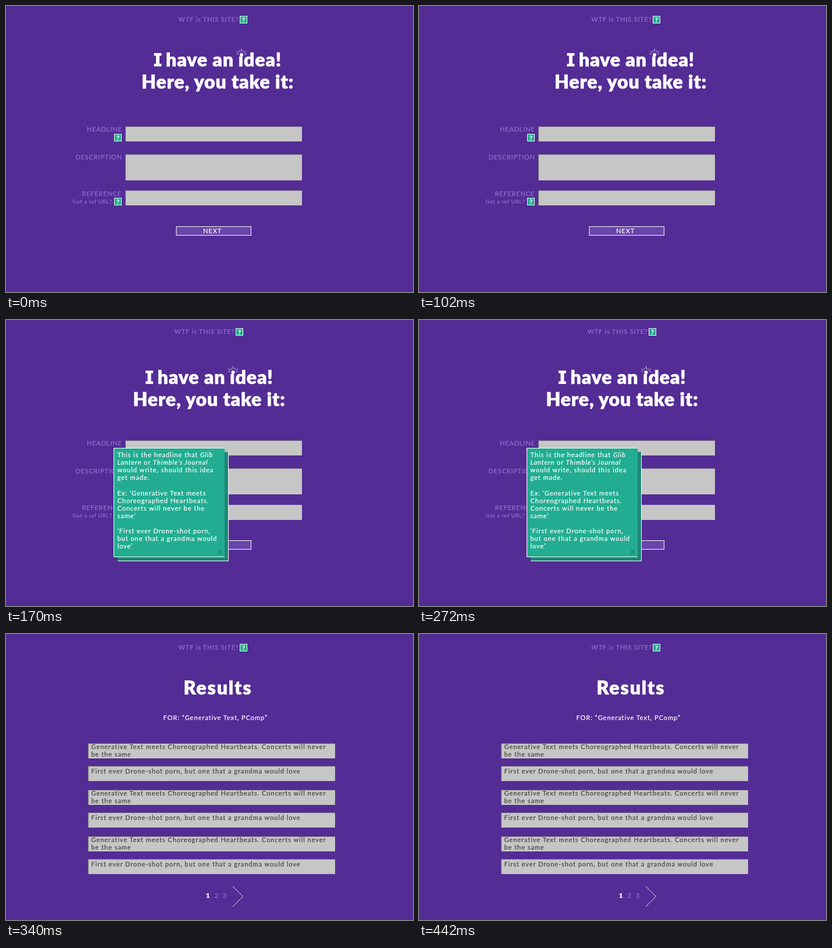
Recreate the animation shown at these times as an HTML page. Size 700 px wide and 492 px high, loop 510 ms.

```html
<!DOCTYPE html>
<html lang="en">
<head>
<meta charset="utf-8">
<title>I have an idea!</title>
<style>
  html, body { margin: 0; width: 100%; height: 100%; overflow: hidden; background: #542c95; }
  svg { display: block; width: 700px; height: 492px; }
  text {
    font: 11px Lato, sans-serif; letter-spacing: .96px; white-space: pre;
    fill: #fff; stroke: #fff; stroke-width: .2px;
  }
  .title { font-size: 32px; font-weight: 900; letter-spacing: .9px; stroke-width: .7px; }
  .wide { letter-spacing: 1.9px; }
  .label { fill: #9470cf; stroke: #9470cf; letter-spacing: .82px; }
  .small { font-size: 9px; letter-spacing: .72px; }
  .dark { fill: #444; stroke: #444; }
  .close { fill: #187a6c; stroke: #187a6c; }
  .page { font-weight: 900; }
  .mark { font-weight: 700; letter-spacing: 0; text-anchor: middle; }
  .line { fill: none; stroke: #fff; }
</style>
</head>
<body>
<svg id="stage" viewBox="0 0 700 492"></svg>
<script>
const SCENE_MS = 170;
const TEAL = '#22ad92';
const GREY = '#c6c6c6';
const stage = document.getElementById('stage');

const text = (x, y, str, cls = '') => `<text x="${x}" y="${y}" class="${cls}">${str}</text>`;
const rect = (x, y, w, h, fill, stroke = 'none') =>
  `<rect x="${x}" y="${y}" width="${w}" height="${h}" fill="${fill}" stroke="${stroke}"/>`;
const path = (d, style = '') => `<path class="line" d="${d}" style="${style}"/>`;
const move = (x, y, body) => `<g transform="translate(${x} ${y})">${body}</g>`;
const italic = str => `<tspan font-style="italic">${str}</tspan>`;

const field = (x, y, w, h) => rect(x, y, w, h, GREY) +
  path(`M${x + .5} ${y + h}V${y + .5}H${x + w}`, 'stroke:#75707a');

const help = (x, y) => rect(x + .5, y + .5, 12, 12, TEAL, '#f0f8f4') +
  text(x + 6.5, y + 10.5, '?', 'mark');

const siteLink = () => text(296.5, 27, 'WTF is THIS SITE?', 'label') + help(402, 17);

function rays(cx, cy) {
  let d = '';
  for (let i = 0; i < 7; i++) {
    const a = Math.PI * (1.06 + i * .147);
    const at = r => `${(cx + r * Math.cos(a)).toFixed(1)} ${(cy + r * Math.sin(a)).toFixed(1)}`;
    d += `M${at(5.5)}L${at(i % 2 ? 10.5 : 8.5)}`;
  }
  return path(d, 'stroke-width:.8');
}

function headline() {
  return '<path d="M254.5 81h13v4.5h-3.5v14h3.5v4.5h-13v-4.5h3.5v-14h-3.5z" fill="#fff"/>' +
    text(275, 104, 'have an', 'title') + text(399.5, 104, 'ıdea!', 'title') +
    '<circle cx="405" cy="84" r="3" fill="#fff"/>' + rays(405, 84) +
    text(233, 142, 'Here, you take it:', 'title');
}

function form(reference) {
  return text(139, 215.5, 'HEADLINE', 'label') + help(186, 220) + field(205, 207, 304, 26) +
    text(119.5, 264, 'DESCRIPTION', 'label') + field(205, 255, 304, 45) +
    text(130.5, 326.5, 'REFERENCE', 'label') + text(114.5, 340, 'Got a ref URL?', 'label small') +
    help(186, 330) + reference +
    rect(293, 379.5, 128.5, 15, '#6846aa', '#fff') + text(339, 391, 'NEXT');
}

function popup() {
  const lines = [
    `This is the headline that ${italic('Glib')}`,
    `${italic('Lantern')} or ${italic('Thimble’s Journal')}`,
    'would write, should this idea', 'get made.', '',
    'Ex: ‘Generative Text meets', 'Choreographed Heartbeats.',
    'Concerts will never be the', 'same’', '',
    '‘First ever Drone-shot porn,', 'but one that a grandma would', 'love’'
  ];
  return rect(192, 227, 190, 187, '#1f8577') + path('M192 414.5H382.5V227') +
    rect(185, 220, 191, 188, TEAL) + path('M376 220.5H185.5V407.5H376') +
    lines.map((line, i) => text(191.5, 236 + i * 13.1, line)).join('') +
    text(364, 403, 'X', 'close');
}

function results() {
  let rows = '';
  for (let i = 0; i < 3; i++) {
    const y = i * 80.2;
    rows += field(141, Math.round(187.5 + y), 425, 26) + field(141, Math.round(227 + y), 425, 26) +
      text(146.5, 198 + y, 'Generative Text meets Choreographed Heartbeats. Concerts will never', 'dark') +
      text(146.5, 211 + y, 'be the same', 'dark') +
      text(146.5, 239.7 + y, 'First ever Drone-shot porn, but one that a grandma would love', 'dark');
  }
  return text(305.5, 103.5, 'Results', 'title wide') +
    text(270.5, 148, 'FOR: “Generative Text, PComp”') + rows +
    text(344, 453.5, '1', 'page') + text(358.5, 453.5, '2', 'label') + text(373, 453.5, '3', 'label') +
    path('M390 434L407.5 451.5L390 469', 'stroke:#e8e0c8');
}

const scenes = [
  siteLink() + headline() + form(field(205, 317, 304, 26)),
  move(-7, -3, siteLink()) + move(-14.5, 6, headline()) + form(rect(205, 318, 304, 26, GREY)) + popup(),
  siteLink() + results()
];
stage.innerHTML = scenes.map(body => `<g>${body}</g>`).join('');
const groups = [...stage.children];

function render(ms) {
  const current = Math.floor(ms / SCENE_MS) % groups.length;
  groups.forEach((g, i) => g.setAttribute('visibility', i === current ? 'visible' : 'hidden'));
}

const start = performance.now();
function tick() {
  render(performance.now() - start);
  requestAnimationFrame(tick);
}
tick();
</script>
</body>
</html>
```
